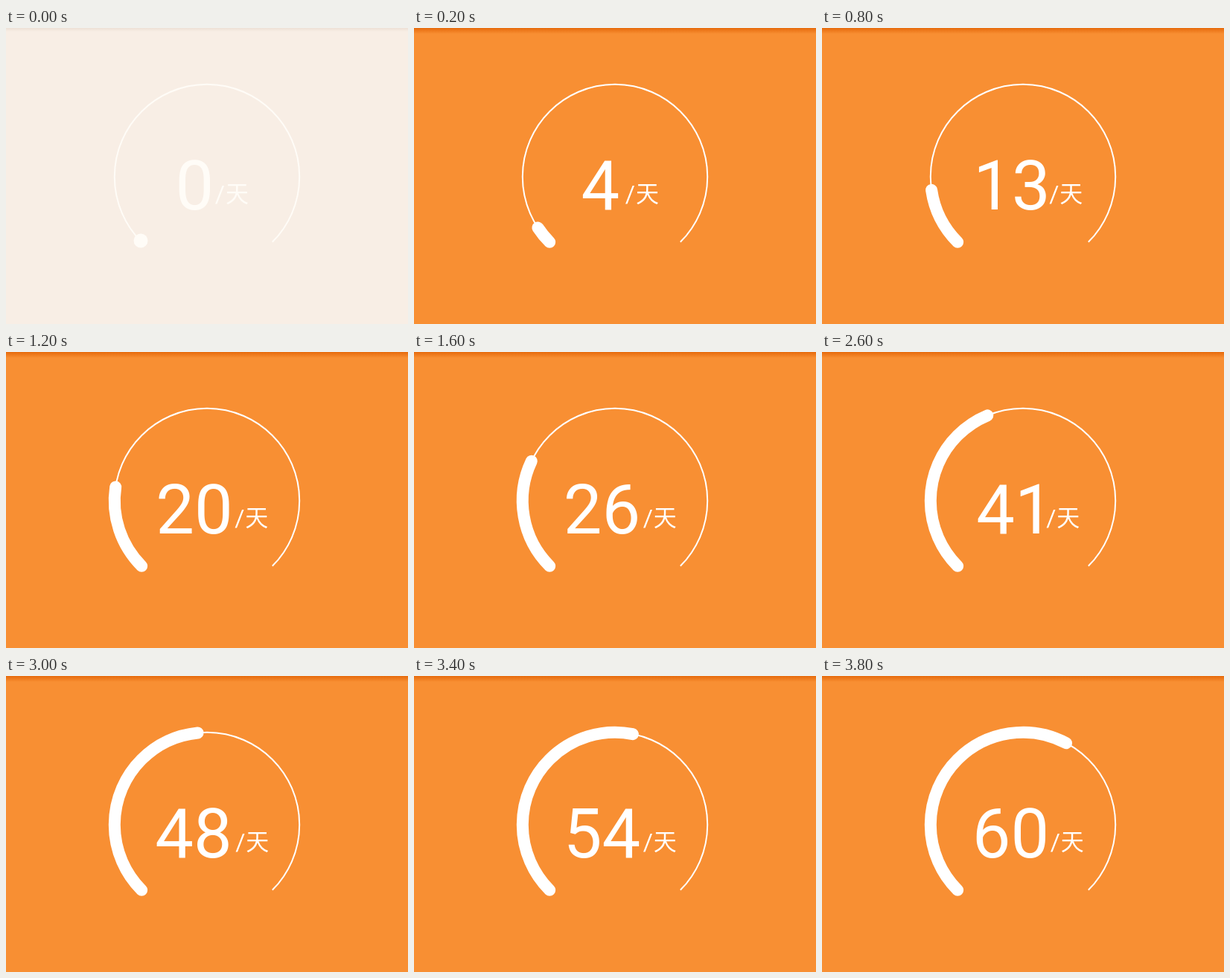
Recreate the animation shown at these times as an HTML page with a canvas. Size 540 by 398 pixels, loop 4000 ms.

```html
<!DOCTYPE html>
<html lang="zh-CN">
<head>
<meta charset="utf-8">
<title>Daily gauge</title>
<style>
  html, body { margin: 0; width: 100%; height: 100%; overflow: hidden; background: #f88f33; }
  canvas { display: block; }
</style>
</head>
<body>
<canvas id="stage" width="540" height="398"></canvas>
<script>
const ctx = document.getElementById("stage").getContext("2d");
const LOOP = 4000, STEP = 200;
const CX = 270, CY = 200, RADIUS = 124.2;
const START = Math.PI * 0.75, SWEEP = Math.PI * 1.5;
const TEXT_CENTER = 248.6;

const themes = {
  pale: { back: "#f8eee5", ink: "#fffcf7", edge: "#ede0d5", depth: 5 },
  warm: { back: "#f88f33", ink: "#ffffff", edge: "#e66a0c", depth: 8 }
};

function drawBackground({ back, edge, depth }) {
  ctx.fillStyle = back;
  ctx.fillRect(0, 0, 540, 398);
  const shade = ctx.createLinearGradient(0, 0, 0, depth);
  shade.addColorStop(0, edge);
  shade.addColorStop(1, back);
  ctx.fillStyle = shade;
  ctx.fillRect(0, 0, 540, depth);
}

function drawArc(share, width, cap) {
  ctx.lineWidth = width;
  ctx.lineCap = cap;
  ctx.beginPath();
  ctx.arc(CX, CY, RADIUS, START, START + SWEEP * share);
  ctx.stroke();
}

function drawDot(x, y, r) {
  ctx.beginPath();
  ctx.arc(x, y, r, 0, Math.PI * 2);
  ctx.fill();
}

// The unit follows the visible width of the number, not its advance.
function drawLabel(value) {
  const text = String(value);
  ctx.font = "92px Roboto, sans-serif";
  const box = ctx.measureText(text);
  const half = (box.actualBoundingBoxRight + box.actualBoundingBoxLeft) / 2;
  ctx.fillText(text, TEXT_CENTER - half, 244);

  const unitX = TEXT_CENTER + half + 11.2;
  ctx.font = "32px Roboto, sans-serif";
  ctx.fillText("/", unitX, 234);
  ctx.font = '31px "Noto Sans CJK SC", "Noto Sans CJK", sans-serif';
  ctx.fillText("天", unitX + 14.2, 234);
}

function draw(now) {
  const step = Math.floor((now % LOOP) / STEP);
  const value = step ? 1.15 + step * 3.115 : 0;
  const theme = step ? themes.warm : themes.pale;

  drawBackground(theme);
  ctx.fillStyle = ctx.strokeStyle = theme.ink;
  drawArc(1, 2, "butt");
  if (step) drawArc(value / 100, 16, "round");
  else drawDot(181, 286, 9.5);
  drawLabel(Math.floor(value + 0.25));
}

const origin = performance.now();
function tick() {
  draw(performance.now() - origin);
  requestAnimationFrame(tick);
}
tick();
</script>
</body>
</html>
```
